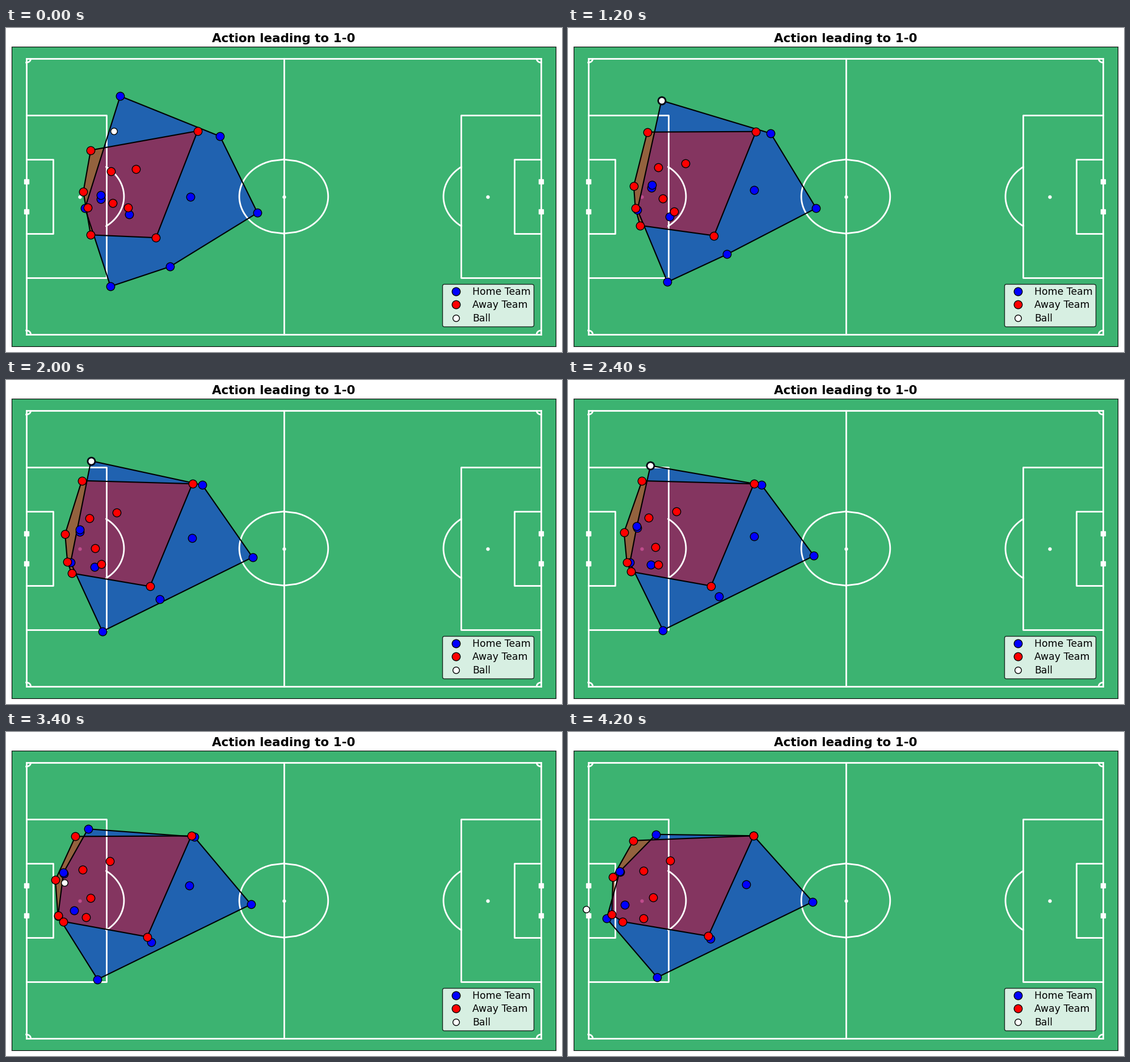
A matplotlib script for the animation above (4.3 s loop, 980x572 px).

```python
import numpy as np
import matplotlib.pyplot as plt
from matplotlib.animation import FuncAnimation

W, H, DPI = 980, 572, 100
FRAMES, INTERVAL = 43, 100
LENGTH, WIDTH, BORDER = 106, 68, 3
YARD = 0.9144
LEFT, TOP, RIGHT, BOTTOM = 10, 33, 969, 562
NUDGE = 0.75  # markers snap half a pixel to the lower right

# Each run is a smooth curve through a few stage points, evenly spaced in time
HOME = [
    [(202, 121), (161, 132), (144, 160.5), (156, 181.5)],
    [(378, 192), (355, 186.5), (337.5, 186), (328, 184)],
    [(444, 327), (435, 313), (432, 300.5)],
    [(325.5, 298.5), (329, 285), (327, 274.5), (315, 269.5)],
    [(290, 422), (279, 397), (262.5, 378), (251.5, 366)],
    [(185, 457), (170, 444), (158, 434)],
    [(218, 329.5), (174, 333.5), (136, 323), (101, 306)],
    [(168, 303), (144, 279), (114, 256.5), (92.5, 247.5)],
    [(168, 296), (144.5, 274), (113.5, 254), (92, 247)],
    [(140, 319), (121, 322), (104, 324), (69, 330)],
]
AWAY = [
    [(338.5, 182.5), (329, 184), (328, 184)],
    [(150, 216.5), (139, 182), (128, 180.5), (116, 192.5)],
    [(185.5, 254), (146, 244.5), (134, 246)],
    [(229.5, 249.5), (195, 234), (180.5, 227.5)],
    [(137, 290), (103.5, 272), (80, 256.5)],
    [(188.5, 309.5), (157, 297), (150.5, 293)],
    [(145, 317.5), (116.5, 319), (100, 324), (78, 323)],
    [(216, 318), (183, 325), (152, 327), (133.5, 330)],
    [(150, 366), (115, 341), (97, 335.5)],
    [(265, 371), (254, 365), (248, 361)],
]
# The winger receives the ball, carries it, crosses; it is tapped in
START, TAP, GOAL = (191, 183), (85, 318), (33, 314)
RECEIVE, CROSS, SHOT = 10, 24, 38.5


def to_pitch(points):
    """Stage pixels to metres from the centre spot."""
    points = np.asarray(points, float) - NUDGE
    sx = (RIGHT - LEFT) / (LENGTH + 2 * BORDER)
    sy = (BOTTOM - TOP) / (WIDTH + 2 * BORDER)
    x = (points[..., 0] - (LEFT + RIGHT) / 2) / sx
    y = ((TOP + BOTTOM) / 2 - points[..., 1]) / sy
    return np.stack([x, y], axis=-1)


def run(points):
    """Positions in all frames on the polynomial through the points."""
    n = len(points)
    coef = np.polyfit(np.linspace(0, 1, n), points, n - 1)
    t = np.linspace(0, 1, FRAMES)
    return np.stack([np.polyval(c, t) for c in coef.T], axis=-1)


def ball_path(winger):
    times = [0, RECEIVE, CROSS, SHOT, FRAMES - 1]
    touches = np.array([START, winger[RECEIVE], winger[CROSS], TAP, GOAL])
    frames = np.arange(FRAMES)
    path = np.stack([np.interp(frames, times, c) for c in touches.T], axis=-1)
    path[RECEIVE:CROSS] = winger[RECEIVE:CROSS]
    return path


def convex_hull(points):
    """Closed outline by the monotone chain method."""
    def chain(ordered):
        out = []
        for p in ordered:
            while len(out) > 1:
                a, b = out[-1] - out[-2], p - out[-2]
                if a[0] * b[1] - a[1] * b[0] > 0:
                    break
                out.pop()
            out.append(p)
        return out

    ordered = points[np.lexsort((points[:, 1], points[:, 0]))]
    return np.array(chain(ordered)[:-1] + chain(ordered[::-1]))


def draw_pitch(ax):
    half_l, half_w = LENGTH / 2, WIDTH / 2

    def line(x, y):
        ax.plot(x, y, color="white", lw=2.05)

    def spot(x):
        ax.scatter(x, 0, s=21, color="white", linewidth=0, zorder=1)

    def box(side, depth, width):
        goal, front = side * half_l, side * (half_l - depth * YARD)
        edge = width * YARD / 2
        line([goal, front, front, goal], [edge, edge, -edge, -edge])

    line([0, 0], [-half_w, half_w])
    spot(0)
    y = np.linspace(-1, 1, 50) * 10 * YARD
    x = np.sqrt((10 * YARD) ** 2 - y**2)
    line(x, y)
    line(-x, y)

    for s in (-1, 1):
        line([-half_l, half_l], [s * half_w] * 2)
        line([s * half_l] * 2, [-half_w, half_w])
        ax.plot([s * half_l] * 2, [-4 * YARD, 4 * YARD], "ws", ms=6.2)
        box(s, 6, 20)
        box(s, 18, 44)
        spot(s * (half_l - 12 * YARD))
        y = np.linspace(0, 1, 50) * YARD
        x = np.sqrt(YARD**2 - y**2)
        for v in (-1, 1):
            line(s * (half_l - x), v * (half_w - y))
        y = np.linspace(-1, 1, 50) * 8 * YARD
        x = np.sqrt((10 * YARD) ** 2 - y**2) + 12 * YARD
        line(s * (half_l - x), y)


plt.rcParams["font.family"] = "DejaVu Sans"
fig = plt.figure(figsize=(W / DPI, H / DPI), dpi=DPI, facecolor="white")
ax = fig.add_axes([LEFT / W, 1 - BOTTOM / H, (RIGHT - LEFT) / W, (BOTTOM - TOP) / H])
ax.set_facecolor("mediumseagreen")
ax.set_xticks([])
ax.set_yticks([])
draw_pitch(ax)
ax.set_xlim(-LENGTH / 2 - BORDER, LENGTH / 2 + BORDER)
ax.set_ylim(-WIDTH / 2 - BORDER, WIDTH / 2 + BORDER)
ax.set_title("Action leading to 1-0", fontsize=15.5, fontweight="bold")


def dots(color, size, label, zorder):
    return ax.plot([], [], "o", color=color, mec="black", mew=1, ms=size,
                   label=label, zorder=zorder)[0]


def make_team(runs, color, label, zorder):
    paths = np.array([run(points) for points in runs])
    area = ax.fill([0, 0, 0], [0, 0, 0], color=color, alpha=0.45, lw=0, zorder=1)[0]
    outline = ax.plot([], [], color="black", lw=1.55, zorder=2.5)[0]
    return paths, area, outline, dots(color, 10.35, label, zorder)


teams = [make_team(HOME, "blue", "Home Team", 3),
         make_team(AWAY, "red", "Away Team", 3.1)]
ball = dots("white", 8.3, "Ball", 3.2)
ball_track = ball_path(teams[0][0][0])

ax.legend(loc="lower left", bbox_to_anchor=(769 / W, 45 / H),
          bbox_transform=fig.transFigure, borderaxespad=0, fontsize=12.4,
          borderpad=0.28, labelspacing=0.33, handlelength=2.2,
          handletextpad=0.6, edgecolor="black", framealpha=0.8)


def update(frame):
    artists = []
    for paths, area, outline, players in teams:
        points = to_pitch(paths[:, frame])
        hull = convex_hull(points)
        area.set_xy(hull)
        outline.set_data(hull[:, 0], hull[:, 1])
        players.set_data(points[:, 0], points[:, 1])
        artists += [area, outline, players]
    x, y = to_pitch(ball_track[frame])
    ball.set_data([x], [y])
    return artists + [ball]


anim = FuncAnimation(fig, update, frames=FRAMES, interval=INTERVAL,
                     repeat=True, repeat_delay=0, blit=False)
plt.show()
```
